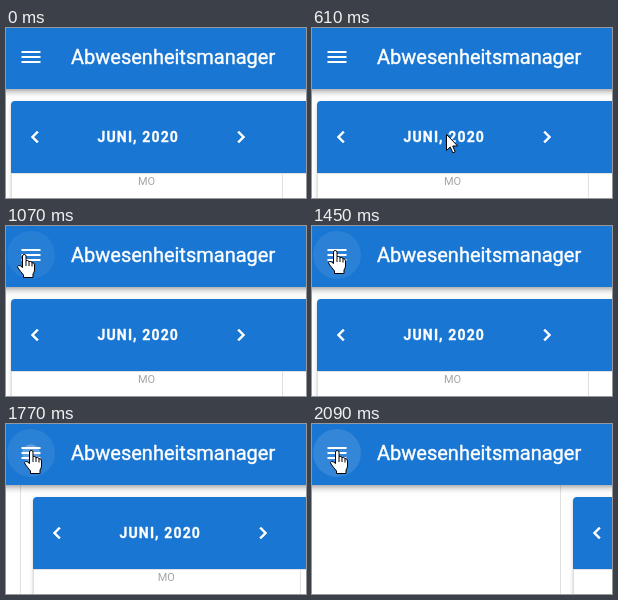
Write an HTML page that moves like this. It is 300x170 px and loops after 2.64 s.

```html
<!DOCTYPE html>
<html lang="de">
<head>
<meta charset="utf-8">
<style>
html, body { margin: 0; width: 100%; height: 100%; overflow: hidden; background: #fff; }
#stage { position: relative; width: 300px; height: 170px; overflow: hidden; font-family: Roboto, sans-serif; color: #fff; }
#stage div, svg { position: absolute; box-sizing: border-box; }
svg { overflow: visible; fill: #fff; }
#bar {
  left: -20px; top: -3px; width: 340px; height: 64px; background: #1976d2;
  box-shadow: 0 2px 4px -1px rgba(0,0,0,.2), 0 4px 5px rgba(0,0,0,.14), 0 1px 10px rgba(0,0,0,.12);
}
#title { left: 65px; top: 17px; font-size: 20px; line-height: 24px; white-space: nowrap; -webkit-text-stroke: .4px; }
#drawer { top: 0; left: -257px; width: 258px; height: 180px; background: #fff; border-right: 1px solid #e0e0e0; }
#card {
  left: 5px; top: 73px; height: 140px; border-radius: 4px; background: #fff;
  box-shadow: 0 3px 1px -2px rgba(0,0,0,.2), 0 2px 2px rgba(0,0,0,.14), 0 1px 5px rgba(0,0,0,.12);
}
#head { left: 0; top: 0; width: 100%; height: 72px; border-radius: 4px 4px 0 0; background: #1976d2; }
#head svg { top: 24px; width: 24px; height: 24px; stroke: #fff; stroke-width: .5; }
#month {
  left: 86.5px; top: 24px; font-size: 14px; line-height: 24px; font-weight: 700;
  letter-spacing: 1.15px; white-space: nowrap; -webkit-text-stroke: .3px;
}
#week { left: 0; top: 72px; width: 100%; height: 68px; border: solid #e0e0e0; border-width: 1px 0 0 1px; }
#day {
  left: -1px; top: 0; height: 68px; border-right: 1px solid #e0e0e0;
  color: #a4a4a4; font-size: 11px; line-height: 16px; text-align: center;
}
.pointer { fill: #fff; stroke: #000; stroke-linejoin: round; }
</style>
</head>
<body>
<div id="stage">
  <div id="drawer"></div>
  <div id="card">
    <div id="head">
      <svg style="left:12px"><path d="M15.41 16.58 10.83 12l4.58-4.59L14 6l-6 6 6 6z"/></svg>
      <div id="month">JUNI, 2020</div>
      <svg style="left:218px"><path d="M8.59 16.58 13.17 12 8.59 7.41 10 6l6 6-6 6z"/></svg>
    </div>
    <div id="week"><div id="day">MO</div></div>
  </div>
  <div id="bar"></div>
  <div id="title">Abwesenheitsmanager</div>
  <svg width="300" height="170" style="left:0;top:0">
    <circle id="hover" cx="25" cy="29" r="24"/>
    <circle id="ripple" cx="25" cy="29"/>
    <path d="M15.5 23h19v2h-19zm0 5h19v2h-19zm0 5h19v2h-19z"/>
    <!-- both pointers have their hot spot at 0,0 -->
    <path id="arrow" class="pointer" d="M.5.5V16.5L4.2 13 6.8 18.8 9.2 17.8 6.7 12H11.7Z"/>
    <g id="hand" class="pointer"><path transform="translate(-6 0)" d="M5.5 13.5V2Q5.5.5 7.2.5T9 2V6.5Q10.8 6 12 7.5 14 7 15 8.5 17.5 8.5 17.5 11V16Q17.5 18 16 20V23.5H6.5V21Q4 18 1 14 0 12 1.5 11.5 3 11 5.5 13.5ZM9 6.5V12M12 7.5V12M15 8.5V12.5"/></g>
  </svg>
</div>
<script>
const LOOP = 2640, STEP = 80, ENTER = 440, PRESS = 1450;
// pointer path: time, x, y
const path = [
  [ENTER, 195, 144], [840, 22, 36], [920, 15, 29],
  [1160, 21, 24], [PRESS, 22, 24], [1530, 24, 26]
];

const $ = id => document.getElementById(id);
const span = (t, start, length) => Math.min(1, Math.max(0, (t - start) / length));
const smooth = x => x * x * (3 - 2 * x);

// cubic-bezier(.4, 0, .2, 1)
function ease(x) {
  let lo = 0, hi = 1;
  for (let i = 0; i < 20; i++) {
    const s = (lo + hi) / 2, r = 1 - s;
    if (1.2 * r * r * s + .6 * r * s * s + s ** 3 < x) lo = s; else hi = s;
  }
  return smooth(hi);
}

function pointerAt(t) {
  let [, x, y] = path[0];
  for (let i = 1; i < path.length; i++) {
    const [start] = path[i - 1], [end, nextX, nextY] = path[i];
    const k = smooth(span(t, start, end - start));
    x += (nextX - x) * k;
    y += (nextY - y) * k;
  }
  return [Math.round(x), Math.round(y)];
}

function draw(t) {
  const shift = 256 * ease(span(t, 1738, 191));
  const column = 271 - shift / 5;
  $('drawer').style.transform = `translateX(${Math.round(shift - 8)}px)`;
  $('card').style.transform = `translateX(${Math.round(shift)}px)`;
  $('card').style.width = column * 5 + 'px';
  $('day').style.width = column + 1 + 'px';

  $('hover').setAttribute('opacity', .08 * span(t, 780, 300));
  $('ripple').setAttribute('r', 24 * ease(span(t, 1710, 200)));
  $('ripple').setAttribute('opacity', .26 - .22 * span(t, 1850, 240));

  const onButton = t >= 840;
  $('arrow').style.display = t >= ENTER && !onButton ? '' : 'none';
  $('hand').style.display = onButton ? '' : 'none';
  $(onButton ? 'hand' : 'arrow').setAttribute('transform', `translate(${pointerAt(t)})`);
}

// the screen refreshes in steps, restarting with the press
function refreshTime(t) {
  if (t < 460) return 0;
  const origin = t < PRESS ? ENTER : PRESS;
  return origin + Math.floor((t - origin) / STEP) * STEP;
}

function frame() {
  draw(refreshTime(performance.now() % LOOP));
  requestAnimationFrame(frame);
}
frame();
</script>
</body>
</html>
```
